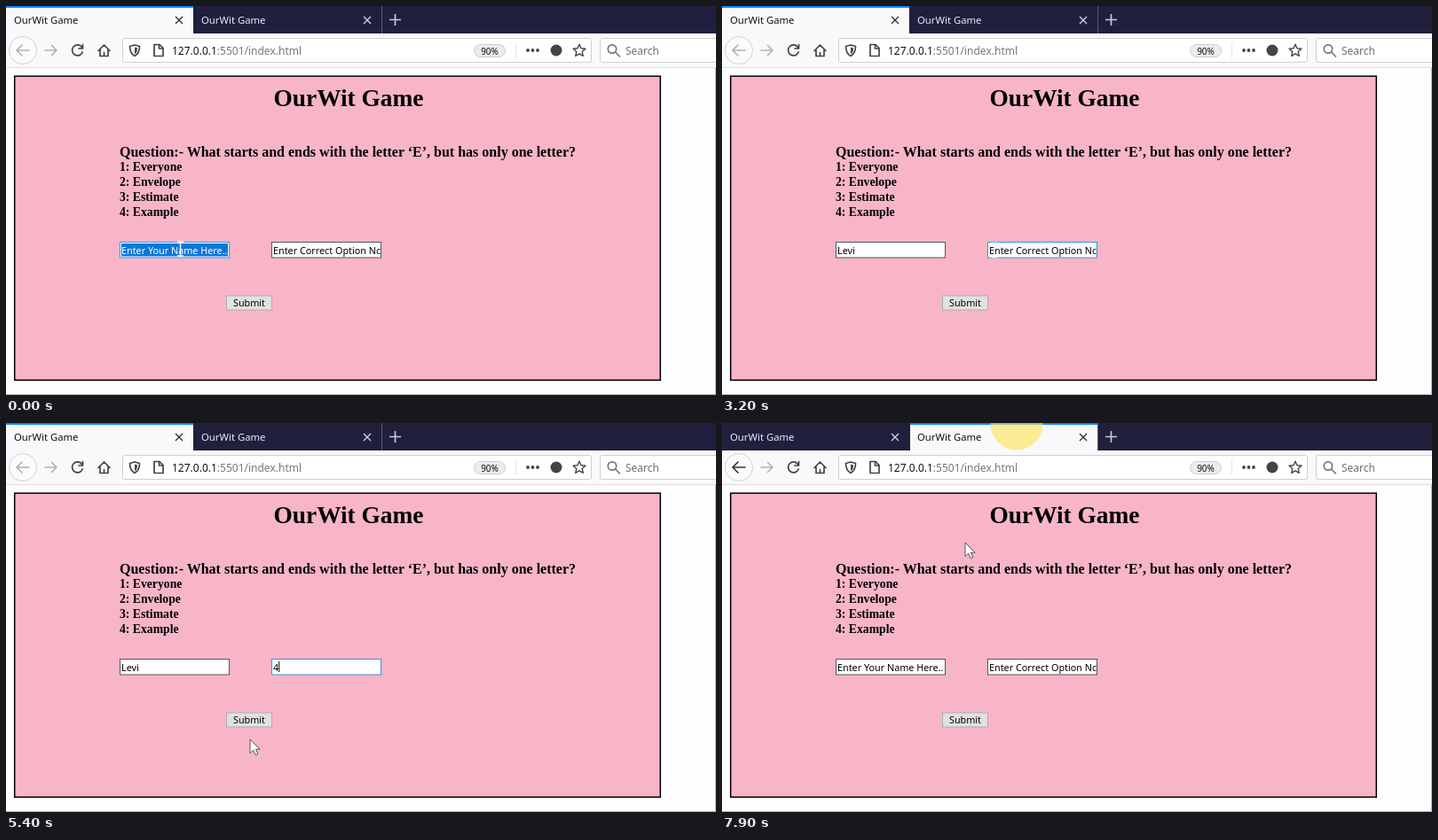
These frames come from a looping animation (800 by 439 pixels, 8000 ms). An HTML page:

```html
<!DOCTYPE html>
<html lang="en">
<head>
<meta charset="utf-8">
<title>OurWit Game</title>
<style>
  html, body { margin: 0; width: 100%; height: 100%; overflow: hidden; background: #fdfdfe; }
  svg { display: block; }
  .ui { font: 12px "Noto Sans", "Open Sans", sans-serif; }
  .tab { font-size: 11.3px; }
  .form { font: 10.8px "Noto Sans", "Open Sans", sans-serif; }
  .page { font: bold 13.7px "Liberation Serif", "Noto Serif", serif; }
  .icon { fill: none; stroke: #444448; stroke-width: 1.7; stroke-linecap: round; stroke-linejoin: round; }
</style>
</head>
<body>
<svg id="stage" width="800" height="439" viewBox="0 0 800 439">
  <rect width="800" height="439" fill="#fdfdfe"/>

  <g class="ui">
    <rect width="800" height="31" fill="#201f3e"/>
    <g id="activeTab">
      <rect width="211" height="31" fill="#f9f9fb"/>
      <rect width="211" height="2" fill="#0a84ff"/>
    </g>
    <path d="M423.5 0V31" stroke="#5c5b73"/>
    <g id="tab0">
      <text class="tab" x="9" y="20">OurWit Game</text>
      <path d="M191 12l8 8m0-8l-8 8" stroke-width="1.4"/>
    </g>
    <g id="tab1" transform="translate(212)">
      <text class="tab" x="8" y="20">OurWit Game</text>
      <path d="M191 12l8 8m0-8l-8 8" stroke-width="1.4"/>
    </g>
    <path d="M432 15.5h13M438.500 9v13" stroke="#c8c8d2" stroke-width="1.7"/>

    <rect y="31" width="800" height="38" fill="#f9f9fb"/>
    <path d="M0 69.500H800" stroke="#dedee2"/>
    <circle cx="19" cy="50" r="15.500" fill="#fbfbfc" stroke="#d2d2d6"/>
    <path id="back" class="icon" d="M26 50H12m6-6l-6 6 6 6"/>
    <path class="icon" style="stroke:#b2b2b6" d="M44 50H57m-5.500-5.500l5.500 5.500-5.500 5.500"/>
    <path class="icon" d="M85.500 46.500a6 6 0 1 0 .7 5.500M86.500 43.500v4.500h-4.500"/>
    <path class="icon" d="M104 50.500l6.500-6.500 6.500 6.500M106 49.500v7h9v-7M110.500 56v-3.500"/>

    <rect x="131.500" y="36.500" width="528" height="27" rx="2" fill="#fff" stroke="#cfcfd3"/>
    <path class="icon" stroke-width="1.500" d="M145 44l5.500 1.500c0 6-2 9-5.500 11-3.500-2-5.500-5-5.500-11z"/>
    <path d="M145 46.500l3 1c0 4-1 5.500-3 7z" fill="#444448"/>
    <path class="icon" d="M167 43.500h6l4 4v9h-10zM172.500 43.500v4.500h4.500"/>
    <text x="187" y="55" fill="#77777c"><tspan fill="#111">127.0.0.1</tspan>:5501/index.html</text>
    <rect x="527.500" y="43.500" width="35" height="14" rx="7" fill="#ececef" stroke="#cfcfd3"/>
    <text x="545" y="54.500" font-size="10" text-anchor="middle" fill="#111">90%</text>
    <path d="M574.500 41V59" stroke="#e7e7ea"/>
    <g fill="#444448">
      <circle cx="588" cy="50" r="1.900"/><circle cx="593.500" cy="50" r="1.900"/><circle cx="599" cy="50" r="1.900"/>
      <circle cx="620" cy="50" r="6.500"/>
    </g>
    <path id="star" class="icon" style="stroke-width:1.400"/>
    <path d="M800 36.500H671.500q-2 0-2 2v23q0 2 2 2H800" fill="#fff" stroke="#cfcfd3"/>
    <circle class="icon" style="stroke:#77777c" cx="683" cy="48.500" r="4.700"/>
    <path class="icon" style="stroke:#77777c" d="M686.500 52l5 5"/>
    <text x="698" y="55" fill="#707075">Search</text>
  </g>

  <path d="M799.500 70V438.500H0" fill="none" stroke="#aeaeb2"/>
  <rect x="9.700" y="79.200" width="727.600" height="343" fill="#f8b5c8" stroke="#000" stroke-width="1.500"/>

  <g class="page">
    <text id="heading" x="386" y="113" font-size="27.360" text-anchor="middle">OurWit Game</text>
    <text x="128" y="169.500" font-size="16">Question:- What starts and ends with the letter ‘E’, but has only one letter?</text>
    <text x="128" y="186">1: Everyone</text>
    <text x="128" y="203">2: Envelope</text>
    <text x="128" y="220">3: Estimate</text>
    <text x="128" y="237">4: Example</text>
  </g>

  <g id="form" class="form">
    <g id="nameField" transform="translate(128 266)"></g>
    <g id="optionField" transform="translate(299 266)"></g>
    <rect x="248.500" y="327" width="51" height="16" fill="#e1e1e1" stroke="#adadad"/>
    <text x="274" y="339" text-anchor="middle">Submit</text>
  </g>

  <circle id="halo" r="29.500" fill="rgb(253,226,77)" fill-opacity=".59"/>
  <path id="ibeam" d="M-3.500-8h3l.5.500.5-.5h3M0-7.500V7.500M-3.500 8h3l.5-.5.5.5h3" fill="none" stroke="#fff" stroke-width="1.500"/>
  <path id="trail" class="arrow"/>
  <path id="arrow" class="arrow"/>
</svg>

<script>
const LOOP = 8000, STEP = 100;
const $ = id => document.getElementById(id);
const show = (el, on) => el.setAttribute('display', on ? 'inline' : 'none');
const place = (el, x, y) => el.setAttribute('transform', `translate(${x} ${y})`);
const within = (t, from, to) => t >= from && t < to;

// Pointer stops: time, x, y
const beamPath = [[0, 196.5, 274], [1700, 196.5, 274], [2400, 307, 275.5], [4800, 307, 275.5]];
const arrowPath = [
  [4800, 307, 276], [5300, 275, 357], [6500, 275, 357], [6700, 280, 336], [6900, 284, 335],
  [7000, 343, 300], [7200, 372, 132], [7300, 359, 1], [7600, 332, 1], [7800, 332, 1], [7900, 274, 135]
];

function along(path, t) {
  let i = 1;
  while (i < path.length - 1 && t > path[i][0]) i++;
  const [a, b] = [path[i - 1], path[i]];
  const u = Math.min(1, Math.max(0, (t - a[0]) / (b[0] - a[0])));
  const k = u * u * (3 - 2 * u);
  return [a[1] + (b[1] - a[1]) * k, a[2] + (b[2] - a[2]) * k];
}

function makeField(id) {
  const root = $(id);
  root.innerHTML = `<rect x=".5" y=".5" width="123" height="17.500" fill="#fff"/>
    <rect x="2" y="2" width="120" height="14.500" fill="#0a78d6"/>
    <svg x="2" width="120.500" height="18"><text y="13.500"></text></svg>
    <path d="M0 3V15" stroke="#000"/>`;
  const [box, mark] = root.querySelectorAll('rect');
  const text = root.querySelector('text'), caret = root.querySelector('path');
  return ({ value, focused, selected, caretOn }) => {
    box.setAttribute('stroke', focused ? '#3f8fe0' : '#55555a');
    show(mark, selected);
    if (text.textContent !== value) text.textContent = value;
    text.setAttribute('fill', selected ? '#fff' : '#000');
    show(caret, caretOn);
    if (caretOn) place(caret, 2.5 + text.getComputedTextLength(), 0);
  };
}

const setName = makeField('nameField'), setOption = makeField('optionField');

const star = Array.from({ length: 10 }, (_, i) => {
  const a = i * Math.PI / 5 - Math.PI / 2, r = i % 2 ? 3.4 : 7.3;
  return [646 + r * Math.cos(a), 50.5 + r * Math.sin(a)];
});
$('star').setAttribute('d', `M${star.join('L')}Z`);

document.querySelectorAll('.arrow').forEach(el => {
  el.setAttribute('d', 'M0 0V15.500L3.700 12.200 6.300 17.800 8.900 16.600 6.400 11.200H11.200Z');
  el.setAttribute('fill', '#fff');
  el.setAttribute('stroke', '#444');
  el.setAttribute('stroke-width', '.9');
});

function render(t) {
  const second = t >= 7800;
  const submitted = within(t, 6900, 7800);
  place($('activeTab'), second ? 212 : 0, 0);
  [$('tab0'), $('tab1')].forEach((tab, i) => {
    const active = second === (i === 1);
    tab.setAttribute('fill', active ? '#111' : '#ececf2');
    tab.setAttribute('stroke', 'none');
    tab.querySelector('path').setAttribute('stroke', active ? '#333' : '#d0d0da');
  });
  $('back').style.stroke = second ? '#333338' : '#b2b2b6';
  show($('heading'), !submitted);
  show($('form'), !submitted);

  const typed = 'Levi'.slice(0, Math.max(0, Math.floor((t - 500) / 200)));
  const onOption = within(t, 2500, 6700);
  const answered = within(t, 4400, 7800);
  setName({
    value: second || !typed ? 'Enter Your Name Here..' : typed,
    focused: t < 2500,
    selected: t < 700,
    caretOn: within(t, 700, 1400)
  });
  setOption({
    value: answered ? '4' : 'Enter Correct Option No.',
    focused: onOption,
    selected: within(t, 3300, 4400),
    caretOn: answered && onOption && (t - 4400) % 1000 < 500 || within(t, 5300, 5500)
  });

  const beam = t < 4900;
  const [x, y] = along(beam ? beamPath : arrowPath, t);
  show($('ibeam'), beam);
  show($('arrow'), !beam && !within(t, 7600, 7800));
  place(beam ? $('ibeam') : $('arrow'), x, y);

  show($('trail'), within(t, 7300, 7400));
  place($('trail'), 372, 132);

  const halo = $('halo');
  show(halo, within(t, 2500, 2800) || within(t, 6700, 7000) || t >= 7600);
  if (t >= 7600) place(halo, 332, 1);
  else place(halo, x, y);
}

function tick(now) {
  render(Math.floor(now % LOOP / STEP) * STEP);
  requestAnimationFrame(tick);
}
render(0);
requestAnimationFrame(tick);
</script>
</body>
</html>
```
